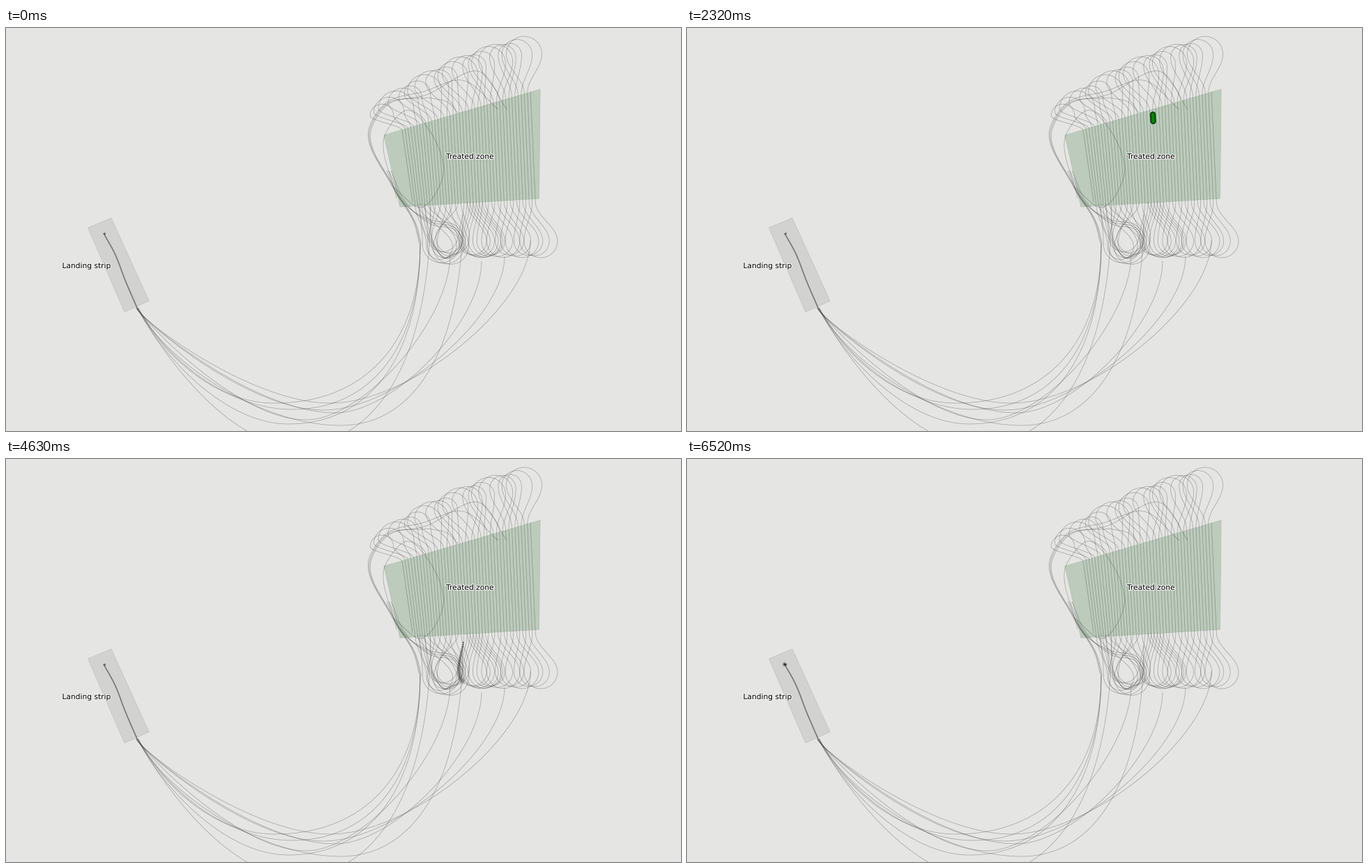
Write a matplotlib script that moves like this. It is 968 by 579 pixels and loops after 8000 ms.

```python
import numpy as np
import matplotlib.pyplot as plt
from matplotlib.animation import FuncAnimation
from matplotlib.collections import LineCollection
from matplotlib.patches import Polygon
from matplotlib.patheffects import withStroke

W, H, DPI = 968, 579, 64
PX = 72 / DPI                  # points per pixel
TICK, LOOP = 50, 8000
ENTRY, EXIT = 122, 250         # where passes start to show, zone bottom

PASSES = 753.5 - 4.5 * np.arange(43)
STRIP = [(140, 295), (155, 322), (172, 365), (188, 402)]
CLIMB = [(594, 310), (588, 285), (555, 228), (522, 145), (546, 109), (606, 100)]
OVAL = [(560, 245), (545, 150), (575, 118), (612, 155), (627, 210), (595, 258),
        (555, 228)]

# ferry routes: lowest point, far end
DIRECT = [((465, 539), (752, 305)), ((455, 549), (715, 328)),
          ((472, 553), (682, 335)), ((430, 563), (637, 325))]
WIDE = [((480, 571), (655, 268)), ((415, 600), (609, 255)),
        ((385, 539), CLIMB[0]), ((410, 548), CLIMB[0])]
HOMEWARD = ((405, 569), CLIMB[0])

# start ms, end ms, first pass of the pair
SORTIES = [(350, 1130, 17), (1430, 2140, 16), (2320, 3060, 19),
           (3300, 3990, 21), (4170, 4920, 22)]
STEP, PACE = 60, 1.12
HOME_START, HOME_STEP, CRUISE, LANDING = 4920, 61, 14, 12


def lengths(path):
    return np.r_[0, np.cumsum(np.hypot(*np.diff(path, axis=0).T))]


def smooth(points, n=12):
    """Cubic Hermite curve through the points."""
    p = np.array(points, float)
    t = lengths(p)
    m = np.gradient(p, t, axis=0)
    u = np.linspace(0, t[-1], n * len(p))
    i = np.clip(np.searchsorted(t, u, side="right") - 1, 0, len(p) - 2)
    h = (t[i + 1] - t[i])[:, None]
    x = (u - t[i])[:, None] / h
    return ((1 + 2 * x) * (1 - x) ** 2 * p[i] + x * (1 - x) ** 2 * h * m[i]
            + x * x * (3 - 2 * x) * p[i + 1] + x * x * (x - 1) * h * m[i + 1])


def bezier(a, b, c, d, n=40):
    a, b, c, d = (np.array(p, float) for p in (a, b, c, d))
    u = np.linspace(0, 1, n)[:, None]
    v = 1 - u
    return v ** 3 * a + 3 * v * v * u * b + 3 * v * u * u * c + u ** 3 * d


def sway(a, b, n=16):
    """S-curve, vertical at both ends."""
    u = np.linspace(0, 1, n)
    return np.c_[a[0] + (b[0] - a[0]) * (1 - np.cos(np.pi * u)) / 2,
                 a[1] + (b[1] - a[1]) * u]


def turn(a, b, cx, cy, r):
    """Teardrop from a, round the right of the circle, back to b."""
    w = np.linspace(0, np.pi, 30)
    side = np.sign(cy - a[1])
    arc = np.c_[cx + np.abs(r) * np.cos(w), cy + side * r * np.sin(w)]
    return np.vstack([sway(a, arc[0]), arc[1:-1], sway(arc[-1], b)])


def at_height(x, y):
    """Point of a pass at height y; passes lean more towards the left edge."""
    u = (PASSES[0] - x) / np.ptp(PASSES)
    return x + (0.045 + 0.1 * u ** 4) * (y - ENTRY), y


def low_end(i):
    return at_height(PASSES[i], EXIT)


def high_end(i):
    x = PASSES[i]
    return at_height(x, 154 - 66 * (x - 542) / 224)


def top_turn(k):
    r = 21 + 4.5 * np.cos(2 * np.pi * k / 4.5)
    apex = 12 + 2.2 * k + 0.12 * k * k + 0.6 * (25.5 - r)
    return turn(high_end(2 * k + 1), high_end(2 * k + 2),
                743 - 10.2 * k, apex + r, r)


def bottom_turn(i):
    a, b = low_end(i), low_end(i + 1)
    mid = (a[0] + b[0]) / 2
    if mid > 655:
        circle = mid + 10, 306, 22 + 2 * np.cos(i)
    else:                      # the western turns crowd together
        circle = 642 + 0.3 * (mid - 655), 308 + 8 * np.sin(i), 22 + 5 * np.cos(i)
    return turn(a, b, *circle)


def ferry(low, end, wide, shift=0.0):
    """From the strip down to the lowest point and up to the end."""
    (lx, ly), (ex, ey) = low, end
    sx, sy = STRIP[-1]
    sx += shift
    dive, bulge = (88, 0.62) if wide else (25, 0.4)
    down = bezier((sx, sy), (sx + 0.47 * dive, sy + 0.88 * dive),
                  (lx - 0.4 * (lx - sx), ly), low)
    up = bezier(low, (lx + bulge * (ex - lx), ly),
                (ex, ey + bulge * (ly - ey)), end)
    return np.vstack([down, up[1:]])


def sortie_path(i):
    return np.vstack([[(PASSES[i], ENTRY)], bottom_turn(i),
                      [(PASSES[i + 1], ENTRY)]])


def all_tracks():
    tracks = [np.array([high_end(i), low_end(i)]) for i in range(len(PASSES))]
    tracks += [top_turn(k) for k in range(21)]
    tracks += [bottom_turn(i) for i in range(0, 42, 2)]
    tracks += [bottom_turn(i) for _, _, i in SORTIES if i % 2]
    for k, (low, end) in enumerate(DIRECT + WIDE):
        tracks.append(ferry(low, end, k >= len(DIRECT), 0.5 * (k - 3.5)))
    strip = smooth(STRIP)
    tracks += [strip + (0.6 * k, 0) for k in (-1, 0, 1)]
    for k in (-1, 1):          # climbs that carry on over the zone
        over = [(x + 1.5 * k, y + k) for x, y in CLIMB[:-1]]
        over += [(600, 94 + 3 * k), (667 + 13 * k, 69 - 6 * k), (712 + 6 * k, 117)]
        tracks.append(smooth(over))
    for k in range(3):         # sweeps from the west edge into the turns
        tracks.append(smooth([(546 + 3 * k, 205), (570 + 2 * k, 252),
                              (610, 276 + 3 * k), (645, 284 + 4 * k),
                              (659 - 4 * k, 308), (635 - 3 * k, 331),
                              (604 + 3 * k, 300), (590 + 5 * k, 252)]))
    return tracks + [smooth(OVAL), HOME, smooth([CLIMB[-1], (634, 107), (648, 122)])]


HOME = np.vstack([smooth(CLIMB)[::-1], ferry(*HOMEWARD, True)[-2::-1],
                  smooth(STRIP)[-2::-1]])
HOME_LEN = lengths(HOME)
# distance flown when the landing leg begins
CRUISE_LEN = HOME_LEN[np.argmin(np.hypot(*(HOME - (348, 556)).T))]
SORTIE_PATHS = [sortie_path(i) for _, _, i in SORTIES]


def trail(path, head, length, spraying):
    """Dots behind the head: offsets, radii in px, colours."""
    dist = lengths(path)
    age = np.linspace(1, 0, max(3, int(length / 3)))
    s = head - age * length
    shown = (s >= -1e-6) & (s <= dist[-1] + 1e-6)
    age, s = age[shown], s[shown]
    xy = np.c_[np.interp(s, dist, path[:, 0]), np.interp(s, dist, path[:, 1])]
    radius = 1.3 + 2 * age
    color = np.full((len(s), 4), 0.08)
    color[:, 3] = 0.5 - 0.33 * age
    if not spraying:
        return xy, radius, color
    wet = xy[:, 1] < EXIT
    radius[wet] = 2.6
    color[wet] = (0.05, 0.15, 0.05, 0.15)
    fresh = wet & (age < 0.24)
    radius[fresh] = 4.2
    color[fresh] = (0, 0.24, 0, 1)
    core = np.tile((0.02, 0.53, 0.02, 1), (fresh.sum(), 1))
    return (np.vstack([xy, xy[fresh]]), np.r_[radius, np.full(len(core), 2.5)],
            np.vstack([color, core]))


def scene(t):
    for (start, end, _), path in zip(SORTIES, SORTIE_PATHS):
        if start <= t < end:
            n = round((end - start) / STEP)
            left = min(n, int(np.ceil((end - t) / STEP)))
            u = (n - left) / (n - 2)
            total = lengths(path)[-1]
            return trail(path, 12 + (total - 14) * u ** PACE, 58, True)
    if t >= HOME_START:
        k = min((t - HOME_START) // HOME_STEP, CRUISE + LANDING)
        if k <= CRUISE:
            return trail(HOME, CRUISE_LEN * k / CRUISE, 68, False)
        u = (k - CRUISE) / LANDING
        rest = HOME_LEN[-1] - CRUISE_LEN
        head = CRUISE_LEN + rest * (1 - (1 - u) ** 1.6)
        return trail(HOME, head, 68 * (1 - u) ** 0.6, False)
    return np.empty((0, 2)), np.empty(0), np.empty((0, 4))


fig = plt.figure(figsize=(W / DPI, H / DPI), dpi=DPI, facecolor="#e5e5e3")
ax = fig.add_axes([0, 0, 1, 1])
ax.set(xlim=(0, W), ylim=(H, 0))
ax.axis("off")

ax.add_patch(Polygon([(117.5, 287), (151, 273), (205, 392), (170, 408)],
                     fc="#d2d2d0", ec="#c3c3c1", lw=0.8 * PX))
ax.add_patch(Polygon([(542, 154), (766, 88), (764.5, 245), (565, 257)],
                     fc="#bccbbc", ec="#b1c3b1", lw=0.8 * PX))
ax.add_collection(LineCollection(all_tracks(), colors=[(0.08, 0.1, 0.08, 0.33)],
                                 linewidths=0.7 * PX, zorder=2))
ax.scatter([141], [295], s=(3.2 * PX) ** 2, color="#222222", alpha=0.5,
           linewidths=0, zorder=2)
dots = ax.scatter([], [], linewidths=0, zorder=3)

for x, y, label in [(631, 188, "Treated zone"), (80.5, 345, "Landing strip")]:
    ax.text(x, y, label, family="DejaVu Sans", size=10.67 * PX, color="black",
            va="baseline", zorder=4,
            path_effects=[withStroke(linewidth=2.2 * PX, foreground="#f4f4f2")])


def draw(frame):
    xy, radius, color = scene(frame * TICK + 30)
    dots.set_offsets(xy)
    dots.set_sizes((2 * radius * PX) ** 2)
    dots.set_facecolors(color)
    return [dots]


anim = FuncAnimation(fig, draw, frames=LOOP // TICK, interval=TICK,
                     init_func=lambda: draw(0), repeat=True, repeat_delay=0)
plt.show()
```
